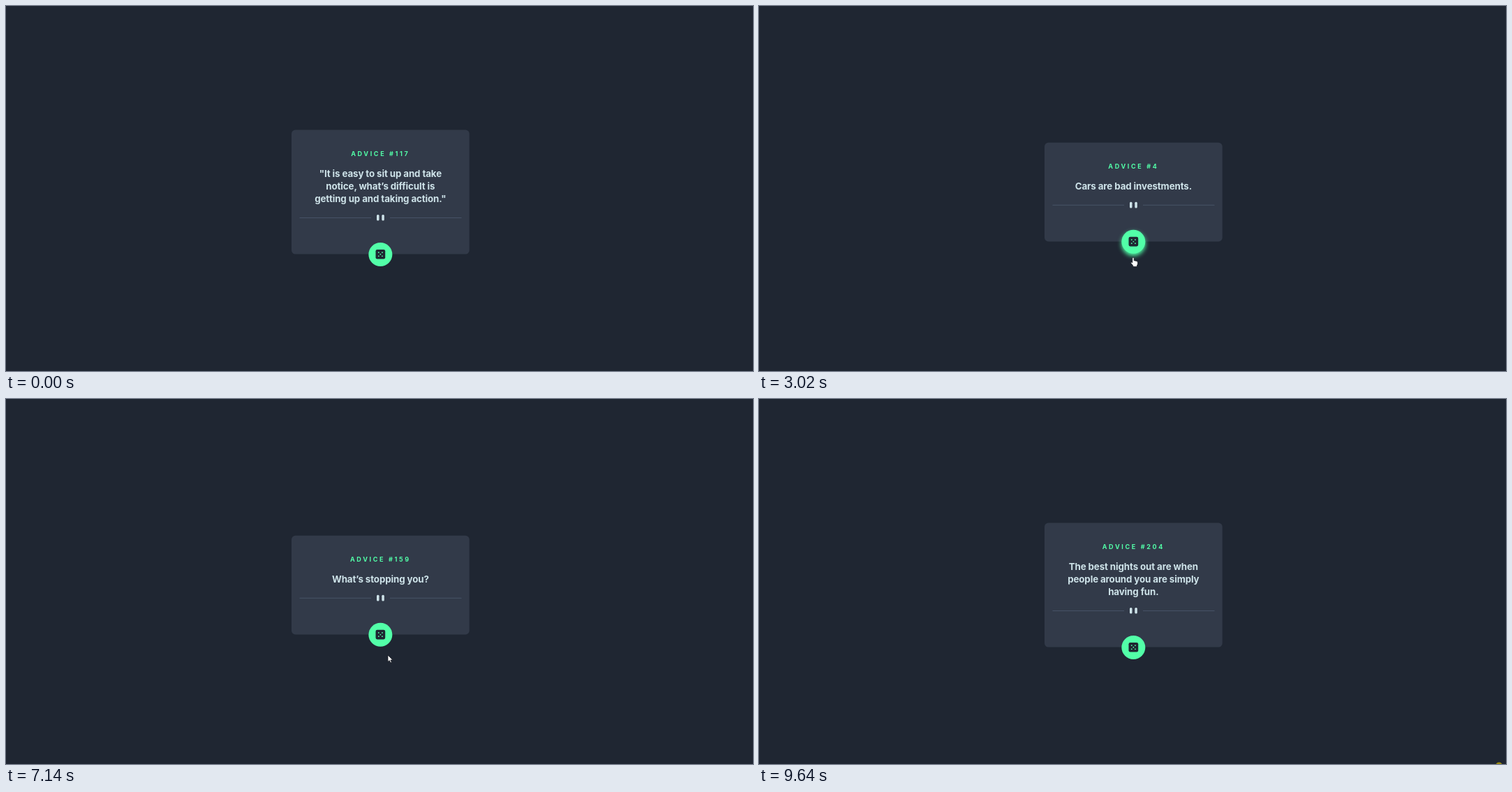
An HTML page for the animation above (9.71 s loop, 1070 px wide and 523 px high).

```html
<!DOCTYPE html>
<html lang="en">
<head>
<meta charset="utf-8">
<title>Advice generator</title>
<style>
  html, body { margin: 0; width: 100%; height: 100%; overflow: hidden; background: #1f2632; }
  svg { display: block; }
  text { font-family: Inter, "Open Sans", sans-serif; font-weight: 700; text-anchor: middle; }
  #title { font-size: 9px; letter-spacing: 2.65px; fill: #52ffa8; }
  #quote { font-size: 13.3px; letter-spacing: -.1px; fill: #cee3e9; }
  #button.hover { filter: drop-shadow(0 3px 3px #52ffa8); }
  .pointer { fill: #fff; stroke: #10141a; stroke-width: .7; stroke-linejoin: round; }
</style>
</head>
<body>
<svg width="1070" height="523" viewBox="0 0 1070 523">
  <rect id="card" x="409" width="254.7" rx="5.5" fill="#323a49"/>
  <text id="title" x="536.35"></text>
  <g id="quote"></g>
  <g id="footer">
    <path d="M420.5 0H523M550 0H652.5" stroke="#4f5d74" stroke-width=".7"/>
    <g fill="#cee3e9">
      <rect x="531" y="-4.5" width="3.5" height="8.6" rx="1.5"/>
      <rect x="538.3" y="-4.5" width="3.5" height="8.6" rx="1.5"/>
    </g>
    <g id="button">
      <circle cx="536.35" cy="52.5" r="17" fill="#52ffa8"/>
      <rect x="529.5" y="45.4" width="13.7" height="13.7" rx="2.3" fill="#1f2632"/>
      <g id="pips" fill="#52ffa8"></g>
    </g>
  </g>
  <path id="arrow" class="pointer" d="M0 0V9.6L2.2 7.6 3.8 11 5.4 10.3 3.9 7H6.9Z"/>
  <path id="hand" class="pointer" d="M-1.2 1.2Q0-.6 1.2 1.2V4.7L5 5.5Q6.5 6 6.5 7.6V9.8L5.4 12V13.6H-.2V12.2L-3.2 8.4Q-3.6 6.6-2 7L-1.2 7.8Z"/>
  <circle id="click" cx="1060" cy="525.5" r="5" fill="#9a8a12"/>
</svg>
<script>
const LOOP = 9710, TICK = 70, CENTER_X = 536.35, LINE = 18.2;
const $ = id => document.getElementById(id);

const advices = [
  { from: 0, id: 117, lines: ['"It is easy to sit up and take', 'notice, what’s difficult is', 'getting up and taking action."'] },
  { from: 3020, id: 4, lines: ['Cars are bad investments.'] },
  { from: 5860, id: 159, lines: ['What’s stopping you?'] },
  { from: 8150, id: 204, lines: ['The best nights out are when', 'people around you are simply', 'having fun.'] },
];

const entry = { x: 1063, y: 537 };
const moves = [
  { from: 120, to: 400, x: 932, y: 305 },
  { from: 730, to: 940, x: 830, y: 282 },
  { from: 1400, to: 2290, x: 536, y: 360 },
  { from: 3690, to: 4580, x: 541, y: 335 },
  { from: 4910, to: 5590, x: 532, y: 336 },
  { from: 6390, to: 6600, x: 551, y: 394 },
  { from: 6930, to: 7490, x: 542, y: 337 },
  { from: 8410, to: 9310, x: 1060, y: 526 },
];

// The pips of a five: centre and four corners
for (let i = 0; i < 9; i += 2) {
  const dx = (i % 3 - 1) * 2.6, dy = (Math.floor(i / 3) - 1) * 2.6;
  $('pips').innerHTML += `<circle cx="${CENTER_X + dx}" cy="${52.25 + dy}" r=".9"/>`;
}

const easeOut = u => u * (1.15 - .15 * u);

// The pointer advances once per tick, starting with the first one of a move
function pointerAt(t) {
  let { x, y } = entry;
  for (const move of moves) {
    if (t < move.from) break;
    const elapsed = (Math.floor((t - move.from) / TICK) + 1) * TICK;
    const u = easeOut(Math.min(1, elapsed / (move.to - move.from + TICK)));
    x += (move.x - x) * u;
    y += (move.y - y) * u;
  }
  return [Math.round(x), Math.round(y)];
}

let shown;
function showAdvice(advice, shift) {
  if (advice === shown) return;
  shown = advice;
  $('card').setAttribute('y', 177.6 + shift);
  $('card').setAttribute('height', 178 - 2 * shift);
  $('title').setAttribute('y', 215 + shift);
  $('title').textContent = `ADVICE #${advice.id}`;
  $('quote').innerHTML = advice.lines.map((line, i) =>
    `<text x="${CENTER_X}" y="${244.8 + shift + i * LINE}">${line}</text>`).join('');
  $('footer').setAttribute('transform', `translate(0 ${303.5 - shift})`);
}

function show(id, visible) { $(id).style.display = visible ? '' : 'none'; }

function draw() {
  const t = performance.now() % LOOP;
  const advice = advices.findLast(a => t >= a.from);
  const shift = (3 - advice.lines.length) * LINE / 2;
  showAdvice(advice, shift);

  const [x, y] = pointerAt(t);
  const hover = Math.hypot(x - CENTER_X, y - (356 - shift)) < 23;
  for (const id of ['arrow', 'hand']) $(id).setAttribute('transform', `translate(${x} ${y})`);
  show('arrow', !hover);
  show('hand', hover);
  show('click', t >= 9640);
  $('button').classList.toggle('hover', hover);
  requestAnimationFrame(draw);
}
draw();
</script>
</body>
</html>
```
